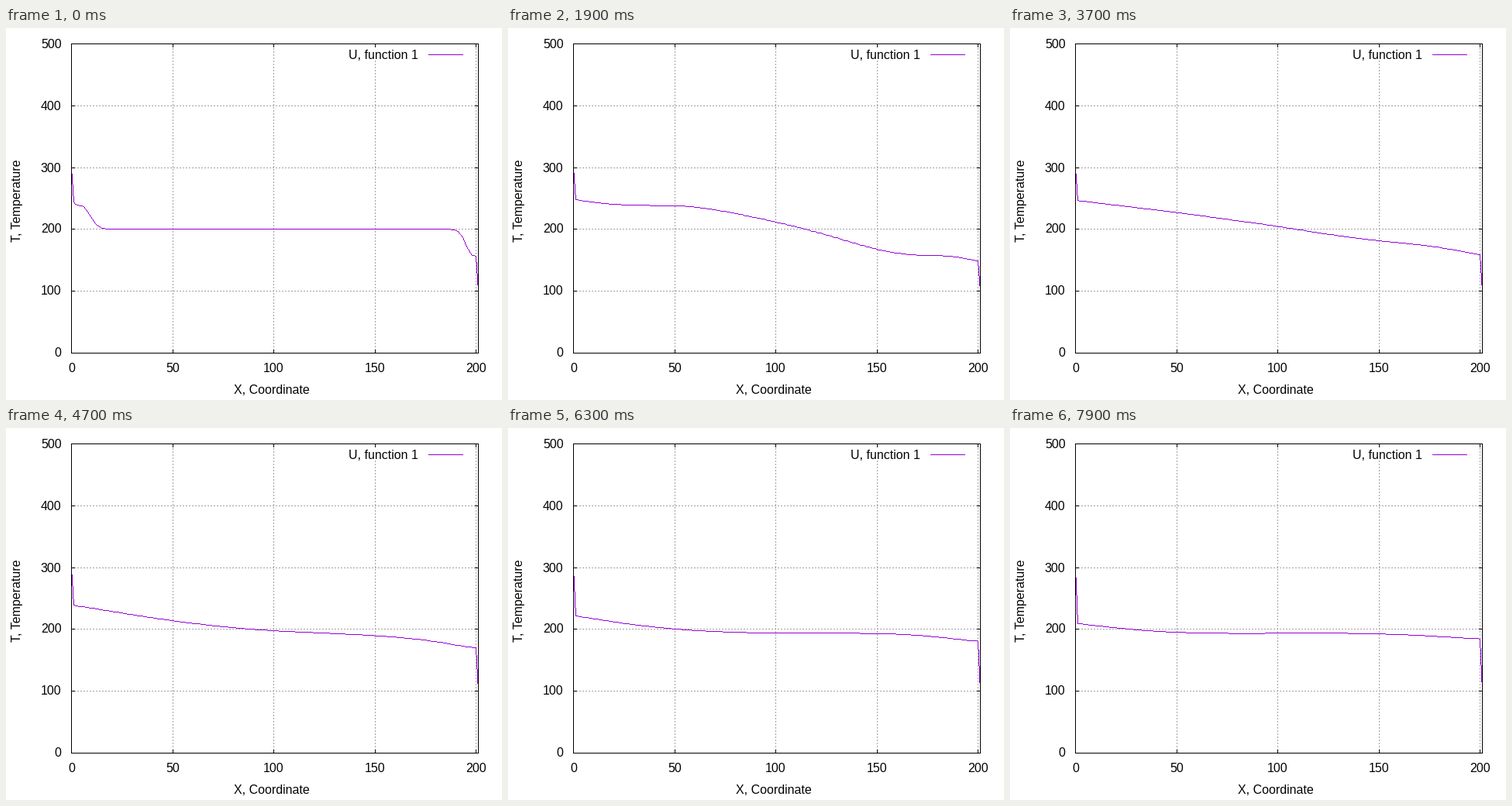
Write a matplotlib script that moves like this. It is 640 by 480 pixels and loops after 8 s.

```python
import numpy as np
import matplotlib.pyplot as plt
from matplotlib.animation import FuncAnimation

W, H, DPI = 640, 480, 80
FRAMES, STEP_MS = 80, 100
LEFT, RIGHT, TOP, BOTTOM = 84, 609, 20, 419
TICK = 4
PX = 72 / DPI  # one pixel in points
PURPLE, GREY = "#9400d3", "#a0a0a0"

plt.rcParams.update({
    "font.family": "Liberation Sans",
    "font.size": 16 * PX,
    "text.hinting": "default",
    "text.hinting_factor": 8,
})


def decay(x, scale, power):
    return np.exp(-(np.maximum(x, 0) / scale) ** power)


def col(x):
    return np.rint(LEFT + (RIGHT - LEFT) * np.asarray(x) / 201).astype(int)


def row(temp):
    return np.rint(BOTTOM - (BOTTOM - TOP) * np.asarray(temp) / 500).astype(int)


def temperature(t):
    """Two self-similar waves run inwards from the walls and cross."""
    x = np.arange(202.0)
    start = np.exp(-t / 3)
    age = t + 2.4 - 0.15 * start
    a = x / age
    b = (200 - x + 1.4 * start) / age
    # wall layer + plateau that ends in a spreading front
    hot = 10.2 * decay(a, 0.69, 1.25) + 38.3 * decay(a - 2.3, 2.453, 1.8)
    cold = -8.7 * decay(b, 0.42, 1.5) - 42.3 * decay(b - 1.1, 2.334, 2.3)
    mix = 0.0012 + 0.004 * np.exp(-((x - 28) / 60) ** 2)
    temp = 200 + hot + cold + mix * hot * cold
    temp[0], temp[-1] = 300, 100
    return x, temp


def raster(xs, ys):
    """One-pixel polyline without antialiasing, as an RGBA layer."""
    layer = np.zeros((H, W, 4), np.uint8)
    for x0, y0, x1, y1 in zip(xs, ys, xs[1:], ys[1:]):
        n = max(abs(x1 - x0), abs(y1 - y0)) + 1
        cx = np.rint(np.linspace(x0, x1, n)).astype(int)
        cy = np.rint(np.linspace(y0, y1, n)).astype(int)
        layer[cy, cx] = (148, 0, 211, 255)
    return layer


fig = plt.figure(figsize=(W / DPI, H / DPI), dpi=DPI, facecolor="white")
ax = fig.add_axes([0, 0, 1, 1])
ax.axis("off")


def line(x0, y0, x1, y1, color="black", z=4, **kw):
    """Straight line that covers both end pixels."""
    dx, dy = 0.5 * np.sign(x1 - x0), 0.5 * np.sign(y1 - y0)
    ax.plot([x0 - dx, x1 + dx], [y0 - dy, y1 + dy], color=color, lw=PX,
            zorder=z, snap=False, solid_capstyle="butt",
            dash_capstyle="butt", **kw)


def grid(*ends):
    line(*ends, color=GREY, z=1, ls=(0, (2, 2)))


def label(x, y, s, ha, **kw):
    ax.text(x, y, s, ha=ha, va="baseline", zorder=5, **kw)


for v in range(0, 201, 50):
    c = col(v)
    if v > 0:
        grid(c, BOTTOM, c, 42 if v == 150 else TOP)  # stops below the legend
    line(c, BOTTOM, c, BOTTOM - TICK)
    line(c, TOP, c, TOP + TICK)
    label(c, 443, str(v), "center")

for v in range(0, 501, 100):
    r = row(v)
    if 0 < v < 500:
        grid(LEFT, r, RIGHT, r)
    line(LEFT, r, LEFT + TICK, r)
    line(RIGHT, r, RIGHT - TICK, r)
    label(71, r + 5, str(v), "right")

for x in (LEFT, RIGHT):
    line(x, TOP, x, BOTTOM)
for y in (TOP, BOTTOM):
    line(LEFT, y, RIGHT, y)

label(294, 471, "X, Coordinate", "left")
label(18, 275, "T, Temperature", "left", rotation=90, rotation_mode="anchor")
label(531, 39, "U, function 1", "right")
line(545, 34, 589, 34, color=PURPLE)

curve = ax.imshow(np.zeros((H, W, 4), np.uint8), interpolation="nearest",
                  extent=(-0.5, W - 0.5, H - 0.5, -0.5), aspect="auto",
                  zorder=2)
ax.set_xlim(-0.5, W - 0.5)
ax.set_ylim(H - 0.5, -0.5)


def update(i):
    x, temp = temperature(i)
    curve.set_data(raster(col(x), row(temp)))
    return (curve,)


ani = FuncAnimation(fig, update, frames=FRAMES, interval=STEP_MS,
                    repeat=True, repeat_delay=0)
plt.show()
```
